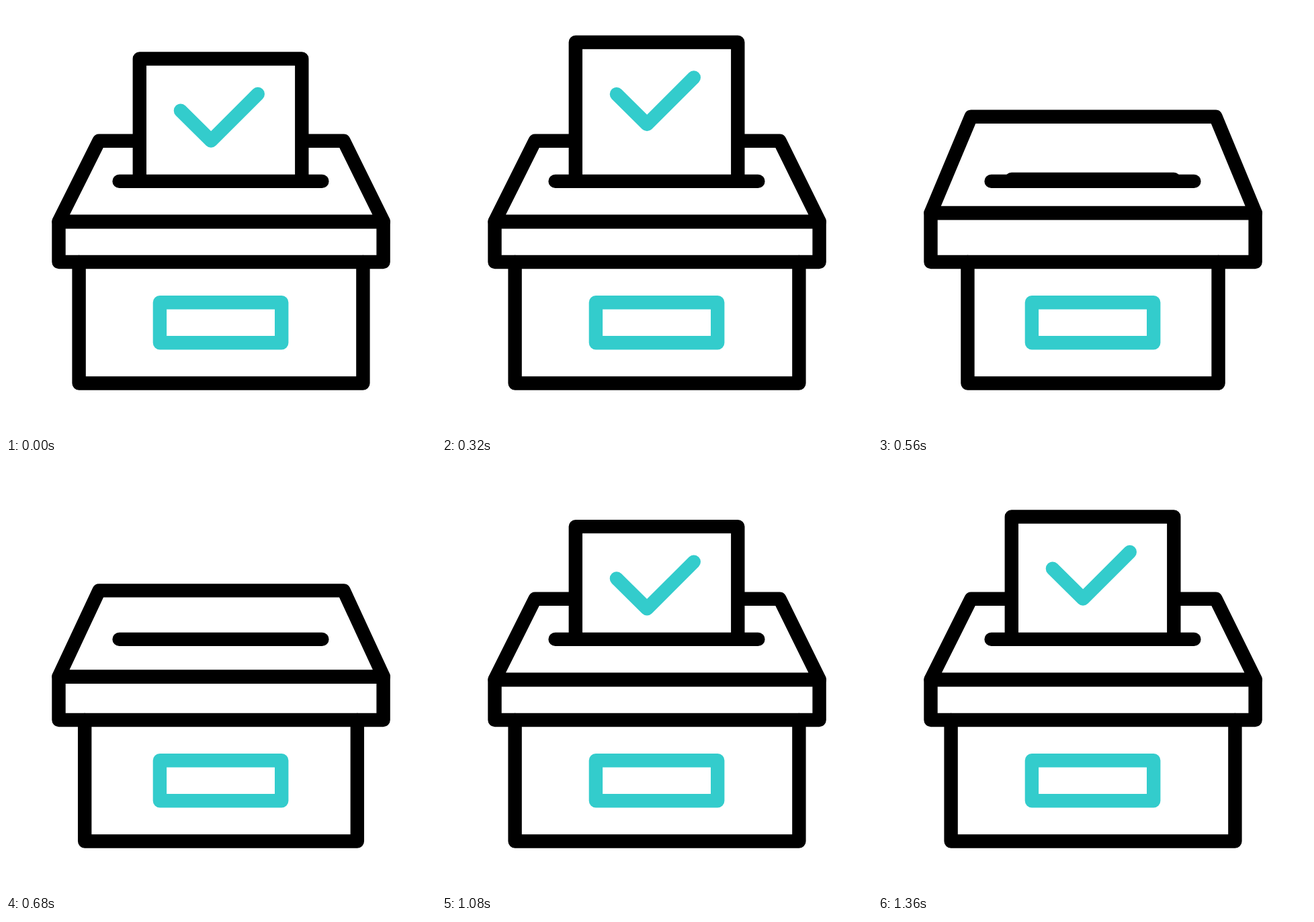
An HTML page for the animation above (1480 ms loop, 640 by 640 pixels).

```html
<!DOCTYPE html>
<html lang="en">
<head>
<meta charset="utf-8">
<title>Ballot box</title>
<style>
  html, body { margin: 0; width: 100%; height: 100%; overflow: hidden; background: #fff; }
  svg { display: block; width: 100%; height: 100%; }
  path { fill: none; stroke: #000; stroke-width: 20.4; stroke-linecap: round; stroke-linejoin: round; }
  .accent { stroke: #3cc; }
  .sheet { fill: #fff; }
</style>
</head>
<body>
<svg viewBox="0 0 640 640">
  <clipPath id="above"><rect width="640" height="261"/></clipPath>
  <path id="body"/>
  <path id="top"/>
  <path id="rim"/>
  <path class="accent" d="M228.9 441.3H410.2V501.3H228.9Z"/>
  <g clip-path="url(#above)">
    <g id="paper">
      <path class="sheet" d="M198.8 330V78.5H440.3V330"/>
      <path class="accent" d="M259.9 155.8L305.1 200.6L374.8 131"/>
    </g>
  </g>
  <path d="M168.6 260.9H470.4"/>
</svg>
<script>
  const LOOP = 1480, STEP = 40;
  const LIFT = -41, HIDDEN = 183, STRETCH = 36;
  const el = id => document.getElementById(id);

  const smooth = p => p * p * (3 - 2 * p);
  const gather = p => p ** 1.4;

  // Eased progress from 0 to 1 between two times.
  const ramp = (t, from, to, ease = smooth) =>
    ease(Math.min(1, Math.max(0, (t - from) / (to - from))));

  // The sheet lifts, drops into the slot, springs back out and settles.
  const paperOffset = t =>
    LIFT * (ramp(t, 140, 400, gather) - ramp(t, 1145, 1345)) +
    (HIDDEN - LIFT) * (ramp(t, 400, 573) - ramp(t, 945, 1145));

  const boxStretch = t => STRETCH * (ramp(t, 359, 559) - ramp(t, 559, 759));

  function draw(time) {
    const t = Math.floor((time % LOOP) / STEP) * STEP;
    const s = boxStretch(t);
    const back = 200.8 - s, front = 320.8 - s * 0.36, inset = s * 0.69;

    el('paper').setAttribute('transform', `translate(0 ${paperOffset(t)})`);
    el('body').setAttribute('d', `M${108.6 + inset} 381V561.5H${531.4 - inset}V381`);
    el('top').setAttribute('d', `M78.5 ${front}L138.5 ${back}H502.6L561.8 ${front}Z`);
    el('rim').setAttribute('d', `M78.5 ${front + 0.5}H561.6V381H78.5Z`);
  }

  const begin = performance.now();
  function tick() {
    draw(performance.now() - begin);
    requestAnimationFrame(tick);
  }
  tick();
</script>
</body>
</html>
```
